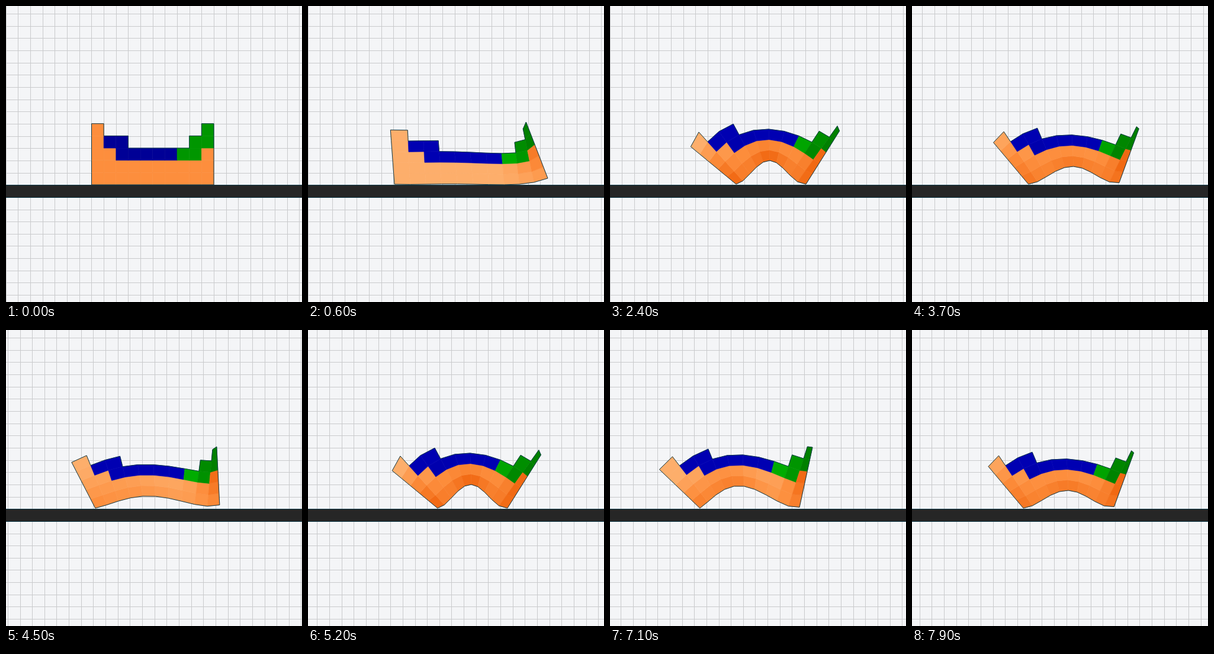
Write an HTML page with a canvas that moves like this. It is 500x500 px and loops after 8 s.

```html
<!DOCTYPE html>
<html>
<head>
<meta charset="utf-8">
<style>
html, body { margin: 0; width: 100%; height: 100%; overflow: hidden; background: #f4f5f7; }
canvas { display: block; }
</style>
</head>
<body>
<canvas id="stage" width="500" height="500"></canvas>
<script>
const ctx = document.getElementById('stage').getContext('2d');
const CELL = 20.65, LOOP = 8000, PERIOD = 1400, STRIDE = 15.15;
const mix = (a, b, u) => a + (b - a) * u;
const mixPoint = (p, q, u) => [mix(p[0], q[0], u), mix(p[1], q[1], u)];
const clamp = (v, lo, hi) => Math.max(lo, Math.min(hi, v));
const smooth = u => u * u * (3 - 2 * u);

// A pose is the sole and the back of the body, each pinned at these columns.
const nodes = [0, 2, 5, 8, 10];
const rest = [0, 3].map(j => nodes.map(i => [144.5 + i * CELL, 302 - j * CELL]));
const stretch = [
  [[139, 301], [192, 301], [272, 301], [350, 301], [398, 291]],
  [[135, 246], [189, 246], [267, 247], [344, 248], [376, 234]]];
const squeeze = [
  [[213, 301], [236, 284], [270, 261], [304, 286], [331, 301]],
  [[167, 263], [197, 230], [268, 208], [341, 230], [365, 247]]];
const lunge = [
  [[176, 301], [201, 277], [246, 261], [300, 288], [337, 300]],
  [[132, 263], [170, 228], [244, 208], [321, 229], [353, 239]]];

const mixPose = (a, b, u) => a.map((row, r) => row.map((p, k) => mixPoint(p, b[r][k], u)));
const shift = (pose, dx) => pose.map(row => row.map(([x, y]) => [x + dx, y]));

// Lagrange curve through the pinned points.
function curve(points, i) {
  const sum = [0, 0];
  points.forEach((p, k) => {
    const w = nodes.reduce((acc, n, m) => m === k ? acc : acc * (i - n) / (nodes[k] - n), 1);
    sum[0] += w * p[0];
    sum[1] += w * p[1];
  });
  return sum;
}

// The camera follows in equal eased steps.
function cameraAt(t) {
  return [2750, 4100, 6820].reduce((x, start) => x - 18.07 * smooth(clamp((t - start) / 1080, 0, 1)), 0);
}

// Stretch out, squeeze together, then lunge one stride to the left.
function poseAt(t) {
  const cycle = Math.floor(t / PERIOD), phase = t % PERIOD;
  const lead = cycle ? 0 : 7;
  const wide = shift(stretch, lead), tight = shift(squeeze, lead);
  let pose;
  if (phase < 600) pose = mixPose(cycle ? lunge : rest, wide, smooth(phase / 600));
  else if (phase < 1000) pose = mixPose(wide, tight, (phase - 600) / 400);
  else pose = mixPose(tight, shift(lunge, cycle ? -STRIDE : 0), ((phase - 1000) / 400) ** 3);
  return shift(pose, -STRIDE * Math.max(0, cycle - 1) - cameraAt(t));
}

// Rows of voxels from the ground up: orange, blue, green.
const body = ['oooooooooo', 'oooooooooo', 'oobbbbbggo', 'obb.....gg', 'o........g'];
const heights = [5, 4, 4, 3, 3, 3, 3, 3, 4, 5];

// Wider voxels are lighter, squeezed ones darker.
function tint(kind, s) {
  if (kind === 'b') return `rgb(0,0,${clamp(150 + (s - 1) * 200, 150, 178)})`;
  if (kind === 'g') return `rgb(0,${clamp(150 + (s - 1) * 150, 128, 172)},0)`;
  const mid = [253, 142, 61];
  const end = s > 1 ? [253, 174, 107] : [241, 105, 19];
  const u = clamp(s > 1 ? (s - 1) / 0.26 : (1 - s) / 0.35, 0, 1);
  return `rgb(${mid.map((v, n) => mix(v, end[n], u))})`;
}

function trace(points) {
  ctx.beginPath();
  points.forEach(p => ctx.lineTo(p[0], p[1]));
  ctx.closePath();
}

function drawGrid(t) {
  ctx.fillStyle = '#f4f5f7';
  ctx.fillRect(0, 0, 500, 500);
  ctx.fillStyle = '#c9cacc';
  const left = (0.33 - cameraAt(t)) % CELL;
  for (let k = 0; k < 25; k++) {
    ctx.fillRect(Math.floor(left + k * CELL), 0, 1, 500);
    ctx.fillRect(0, Math.floor(13.6 + k * CELL), 500, 1);
  }
}

function drawBody(t) {
  const [sole, back] = poseAt(t);
  const at = (i, j) => mixPoint(curve(sole, i), curve(back, i), j / 3);
  const span = (p, q) => Math.hypot(q[0] - p[0], q[1] - p[1]);

  ctx.lineJoin = 'round';
  ctx.lineWidth = 0.6;
  body.forEach((row, j) => [...row].forEach((kind, i) => {
    if (kind === '.') return;
    const [a, b, c, d] = [at(i, j), at(i + 1, j), at(i + 1, j + 1), at(i, j + 1)];
    ctx.fillStyle = ctx.strokeStyle = tint(kind, (span(a, b) + span(c, d)) / 2 / CELL);
    trace([a, b, c, d]);
    ctx.fill();
    ctx.stroke();
  }));

  const edge = [];
  for (let i = 10; i >= 0; i--) edge.push(at(i, 0));
  for (let j = 1; j < 5; j++) edge.push(at(0, j));
  heights.forEach((h, i) => edge.push(at(i, h), at(i + 1, h)));
  for (let j = 4; j > 0; j--) edge.push(at(10, j));
  ctx.lineWidth = 1;
  ctx.strokeStyle = '#0d3848';
  trace(edge);
  ctx.stroke();
}

function drawGround() {
  ctx.fillStyle = '#0d3848';
  ctx.fillRect(0, 302, 500, 22);
  ctx.fillStyle = '#262626';
  ctx.fillRect(0, 303, 500, 20);
}

const start = performance.now();
function tick() {
  const t = Math.floor((performance.now() - start) % LOOP / 100) * 100;
  drawGrid(t);
  drawBody(t);
  drawGround();
  requestAnimationFrame(tick);
}
tick();
</script>
</body>
</html>
```
